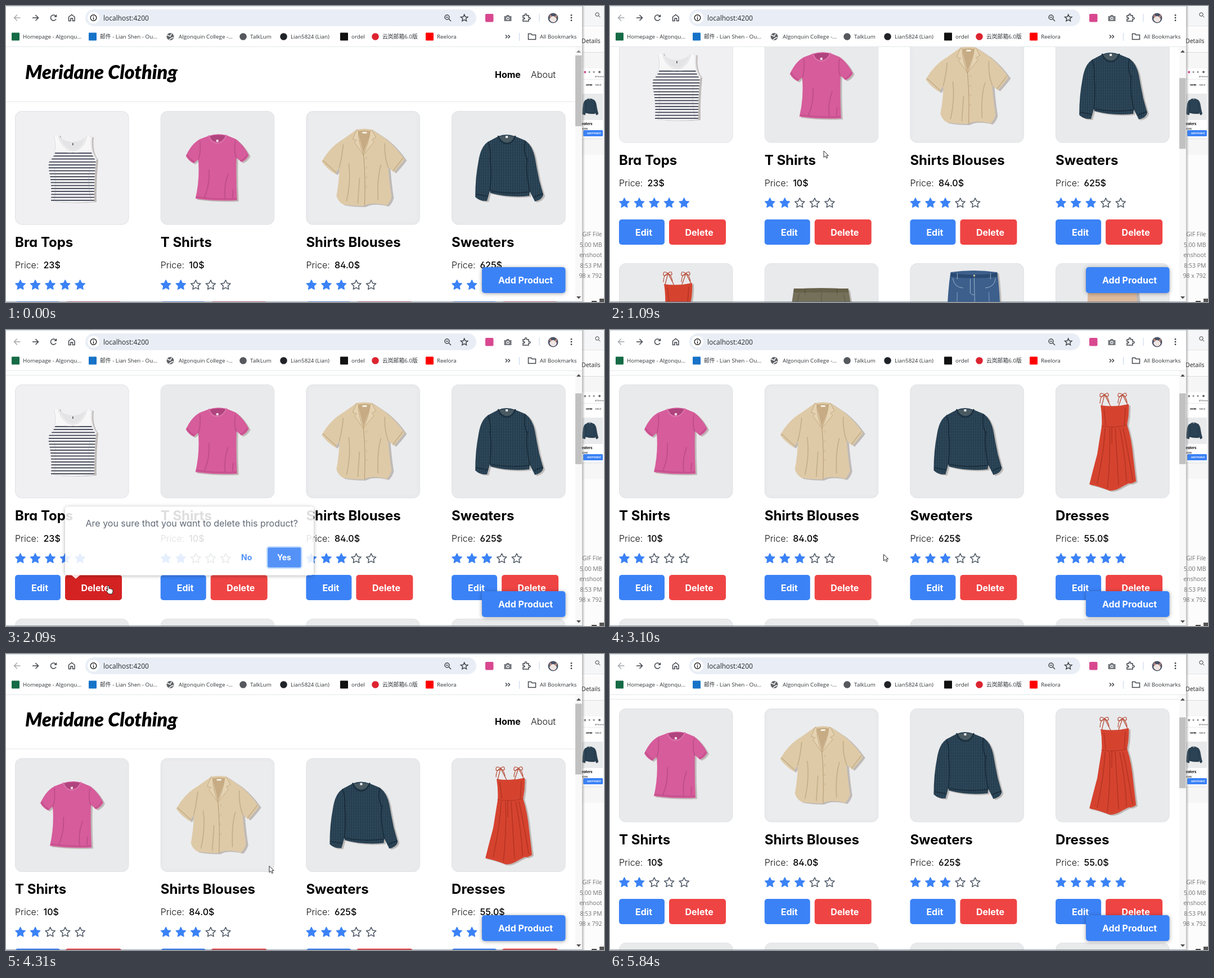
These frames come from a looping animation (1063x527 px, 5910 ms). An HTML page:

```html
<!DOCTYPE html>
<html lang="en">
<head>
<meta charset="utf-8">
<title>Clothing shop</title>
<style>
html, body { margin: 0; width: 100%; height: 100%; overflow: hidden; background: #fff; }
svg { display: block; }
text { white-space: pre; }
.ui { font-family: Inter, sans-serif; font-feature-settings: "cv02", "cv03", "cv04", "cv11"; }
.sys { font-family: "Open Sans", "Noto Sans CJK SC", "Noto Sans CJK", sans-serif; }
.ico { fill: none; stroke: #41464c; stroke-width: 1.5; }
</style>
</head>
<body>
<svg id="stage" width="1063" height="527" viewBox="0 0 1063 527">
<defs>
  <pattern id="stripe" width="200" height="5.25" y="74" patternUnits="userSpaceOnUse">
    <rect width="200" height="5.25" fill="#f4f4f6"/><rect width="200" height="1.8" fill="#3c4150"/>
  </pattern>
  <pattern id="rib" width="4" height="5" patternUnits="userSpaceOnUse">
    <rect width="4" height="5" fill="#2b4557"/><rect width="1.4" height="5" fill="#233a4b"/><rect x="2.4" y="1" width="1" height="2" fill="#345062"/>
  </pattern>
  <clipPath id="view"><rect y="73" width="1012" height="454"/></clipPath>
  <filter id="soft" x="-20%" y="-40%" width="140%" height="190%"><feDropShadow dx="0" dy="1" stdDeviation="3.6" flood-opacity=".36"/></filter>
  <linearGradient id="edge"><stop stop-color="#777" stop-opacity=".5"/><stop offset="1" stop-color="#777" stop-opacity="0"/></linearGradient>
</defs>
</svg>
<script>
const LOOP = 5910, BLUE = '#3b82f6', RED = '#ef4444';
const stage = document.getElementById('stage');

const rect = (x, y, w, h, fill, r = 0, more = '') =>
  `<rect x="${x}" y="${y}" width="${w}" height="${h}" rx="${r}" fill="${fill}" ${more}/>`;
const circle = (x, y, r, fill, more = '') => `<circle cx="${x}" cy="${y}" r="${r}" fill="${fill}" ${more}/>`;
const path = (d, fill, more = '') => `<path d="${d}" fill="${fill}" ${more}/>`;
const line = (d, color, w = 1, more = '') => path(d, 'none', `stroke="${color}" stroke-width="${w}" stroke-linecap="round" ${more}`);
const icon = d => `<path class="ico" d="${d}"/>`;
const ui = (x, y, size, weight, str, fill = '#000') =>
  `<text class="ui" x="${x}" y="${y}" font-size="${size}" font-weight="${weight}" fill="${fill}">${str}</text>`;
const sys = (x, y, size, str, fill = '#303438', more = '') =>
  `<text class="sys" x="${x}" y="${y}" font-size="${size}" fill="${fill}" ${more}>${str}</text>`;

// Outline with a cast shadow behind it
const cloth = (d, fill, dx = 3, dy = 2) =>
  path(d, '#b5aeab', `transform="translate(${dx} ${dy})" opacity=".8"`) + path(d, fill);
const folds = (d, color = '#000', o = .14) => line(d, color, 1.6, `opacity="${o}"`);

const sweater = () => {
  const d = 'M83 45Q97 39 113 45L130 52Q143 60 148 82Q151 100 156 124L163 149Q161 158 148 161L139 143L138 151Q104 155 69 146L68 142L63 160Q50 161 42 153Q42 118 48 88Q52 62 66 54Z';
  return cloth(d, 'url(#rib)') +
    path('M84 46Q98 42 112 46Q107 56 98 56Q89 55 84 46Z', '#4a5a62') + rect(96, 44, 4, 4, '#eee') +
    line('M83 45Q88 58 98 58Q108 58 113 45', '#1b3040', 2.5) +
    folds('M68 142Q72 106 68 84M139 143Q131 106 135 84M65 55Q70 70 69 86M131 53Q127 70 134 86M44 148L64 152M147 153L162 147M70 142Q104 149 138 144', '#08141e', .5);
};

const wear = {
  bra() {
    const neck = 'M77 43Q84 70 103 71Q122 70 128 43', arms = 'M69 45Q77 72 61 88M136 46Q133 72 144 86';
    const body = neck + 'L136 46Q133 72 144 86Q140 124 141 161Q101 165 64 160Q66 130 60 104Q59 96 61 88Q77 72 69 45Z';
    return cloth(body, '#f7f7f8', 4, 1) + path('M77 43Q84 54 103 55Q121 54 128 43Q122 70 103 71Q84 70 77 43Z', '#e4e4e7') +
      rect(102, 57, 1.6, 4, '#555') +
      path('M73 71Q86 75 103 74Q122 75 135 71L144 86Q140 124 141 161Q101 165 64 160Q66 130 60 104Q59 96 61 88Z', 'url(#stripe)') +
      line(neck + arms, '#f7f7f8', 3) + line(neck + arms, '#c7c8cc', .7) +
      folds('M70 100Q75 130 70 158M133 100Q128 128 135 158', '#778', .2);
  },
  tee() {
    const d = 'M86 44Q101 39 117 43L134 50Q149 62 157 79Q152 88 144 91L135 83Q134 120 136 159Q100 161 62 156Q70 122 67 86L59 93Q50 89 45 80Q55 58 70 50Z';
    return cloth(d, '#d65c9b') + path('M87 45Q101 41 116 44Q112 55 101 56Q91 55 87 45Z', '#b0447e') + rect(99, 51, 4, 4, '#f3dce8') +
      line('M86 44Q90 57 101 57Q112 56 117 43', '#dd74ab', 2) +
      folds('M67 87Q72 74 70 54M135 84Q130 74 133 54M78 154Q88 130 86 105M115 156Q112 135 120 112M128 154L129 140M47 78Q52 86 60 91M154 78Q150 86 142 89M64 153Q100 158 135 156', '#702050', .26);
  },
  blouse() {
    const d = 'M90 33Q104 30 117 33L141 49Q160 64 175 86Q168 96 156 109L146 100Q148 128 152 153Q149 163 143 168Q116 161 102 169Q78 169 65 166Q56 160 54 151Q59 124 59 101L52 112Q37 103 28 90Q42 64 66 50Z';
    return cloth(d, '#decaa7', 4, 2) + path('M92 36Q104 33 116 36L102 75Z', '#c6ab84') + rect(100, 37, 8, 3, '#f5efe2') +
      path('M90 33L83 50L90 52L86 56L102 78Q92 52 93 36ZM117 33L124 47L117 51L121 55L102 78Q112 54 114 36Z', '#e4d2b1', 'stroke="#b69a70" stroke-width=".7"') +
      line('M102 77Q106 120 104 168', '#ae936b', .9) +
      [84, 101, 118, 135].map(y => circle(107, y, 1.2, '#f0e4cc', 'stroke="#a98c62" stroke-width=".5"')).join('') +
      folds('M59 101Q64 82 66 60M146 100Q139 82 140 58M72 160Q80 125 76 94M128 158Q126 120 133 96M92 164L95 120M30 88L53 109M172 84L155 106', '#644820', .22);
  },
  sweater,
  dress() {
    const d = 'M80 37Q105 41 130 35Q131 54 127 72Q135 96 138 130L143 172Q137 177 130 176L120 181Q106 190 96 189Q76 181 60 178Q67 150 74 124Q78 98 82 74Q83 56 80 37Z';
    const bow = 'M0 0Q-8 3 -8 15M0 0Q6 3 8 14M0 0Q-9 -6 -8 3Q-5 6 0 0Q7 -6 7 2Q4 5 0 0';
    return cloth(d, '#d5432f') + line('M82 38L87 18L98 39M112 38L119 18L128 36', '#b8503c', 1.3) +
      [87, 119].map(x => line(bow, '#b8503c', 1.3, `transform="translate(${x} 18)"`)).join('') +
      line('M82 74Q105 78 127 72', '#b33321', 1.2) +
      folds('M88 78Q86 120 74 176M96 78Q98 130 92 184M106 78Q109 125 112 179M114 78Q124 125 126 174M120 78Q129 120 137 170M86 44L89 72M124 42L122 72M100 76L100 105', '#721408', .3);
  },
  shorts: () => cloth('M52 46Q101 42 149 46Q156 90 164 135L108 140L101 98L94 140L38 135Q46 90 52 46Z', '#74705a') +
    rect(52, 45, 97, 7, '#666149') + folds('M101 53L101 98M62 55L52 90M140 55L150 90M72 46V55M129 46V55'),
  jeans: () => cloth('M72 16Q112 10 155 16Q164 80 158 190L122 192L115 74L106 192L68 190Q62 80 72 16Z', '#3c5f8c') +
    path('M73 17Q112 24 155 17L155 24Q112 29 72 24Z', '#2a4a72') + circle(114, 22, 1.7, '#d9c79a') +
    line('M114 26L115 74M76 27Q78 43 94 44M152 27Q150 43 134 44M84 18V28M143 18V28M107 28V52Q109 57 114 56', '#a9bdd1', .9) +
    folds('M84 52L80 180M140 52L145 180', '#fff', .25),
  cami: () => line('M65 15Q62 30 60 45M132 15Q136 30 140 45M65 15Q79 10 84 21L72 35M132 15Q118 11 114 22L125 35', '#c49470', 1.5) +
    cloth('M58 42Q76 30 98 47Q121 31 142 43L146 80L154 170Q100 178 48 170L56 80Z', '#ddba9c', 6, 3) + folds('M57 82Q100 90 146 82M82 90L76 168M120 90L126 168'),
  vest: () => cloth('M66 46L84 43Q101 66 118 43L136 46Q134 72 148 88L145 164H57L54 88Q68 72 66 46Z', '#f6f4ef') + folds('M72 100L70 160M130 100L133 160')
};

const items = [
  ['bra', 'Bra Tops', '23$', 5], ['tee', 'T Shirts', '10$', 2], ['blouse', 'Shirts Blouses', '84.0$', 3],
  ['sweater', 'Sweaters', '625$', 3], ['dress', 'Dresses', '55.0$', 5], ['shorts', 'Shorts', '32$', 3],
  ['jeans', 'Jeans', '49$', 4], ['cami', 'Camisoles', '18$', 4], ['vest', 'Vests', '15$', 3]
];

function star(x, y, on) {
  const pts = Array.from({ length: 10 }, (_, i) => {
    const r = i % 2 ? 4.4 : 9, a = i * Math.PI / 5 - Math.PI / 2;
    return (x + r * Math.cos(a)).toFixed(1) + ',' + (y + r * Math.sin(a)).toFixed(1);
  });
  return `<polygon points="${pts.join(' ')}" fill="${on ? BLUE : 'none'}" stroke="${on ? BLUE : '#4b5563'}" stroke-width="1.5" stroke-linejoin="round"/>`;
}

// Local origin: top left of the picture box
function card([kind, name, price, rate], i) {
  let s = rect(.5, .5, 201.5, 201.5, kind === 'bra' ? '#f0f0f3' : '#e9eaec', 11.5, 'stroke="#dfe1e5"');
  if (kind === 'blouse') s += rect(5, 5, 192, 192, '#ebecee', 4);
  s += wear[kind]() + ui(0, 241.8, 24, 700, name) + ui(0, 279.6, 16, 300, 'Price:', '#111') + ui(50.5, 279.6, 16, 500, price);
  for (let k = 0; k < 5; k++) s += star(9.5 + k * 26.55, 310, k < rate);
  s += rect(0, 339, 81, 45, BLUE, 5) + rect(89, 339, 101, 45, RED, 5, i ? '' : 'id="del"') +
    ui(29, 367.5, 16, 700, 'Edit', '#fff') + ui(117.5, 367.5, 16, 700, 'Delete', '#fff');
  return `<g class="card">${s}</g>`;
}

const page = `<g clip-path="url(#view)"><g id="page">
  <text x="34" y="130" font-family="Lato, sans-serif" font-size="34" font-weight="900" font-style="italic">Meridane Clothing</text>
  ${ui(869, 127.8, 16, 700, 'Home')}${ui(933, 127.8, 16, 300, 'About', '#111')}
  ${rect(0, 170, 1012, 1, '#e5e7eb')}${items.map(card).join('')}</g></g>`;

const scrollbar = rect(1012, 73, 12, 452, '#f8f8f8') + path('M1014 83L1018 78.5L1022 83Z', '#8a8a8a', 'id="up"') +
  path('M1014 517L1018 521.5L1022 517Z', '#505050') + rect(1012, 88, 11.5, 126, '#c1c1c1', 0, 'id="thumb"');

const addButton = `<g filter="url(#soft)">${rect(846, 465, 148.5, 46, BLUE, 5)}</g>` + ui(875, 493.7, 16, 700, 'Add Product', '#fff');

const popup = `<g id="popup"><g filter="url(#soft)">${rect(105, 314.5, 442, 122, '#fff', 5)}</g>
  ${path('M116 436H132L124 443Z', '#fff')}
  ${ui(141.5, 349.8, 16, 400, 'Are you sure that you want to delete this product?', '#4b5563')}
  ${ui(418, 410, 14, 700, 'No', BLUE)}
  ${rect(464, 386, 61.5, 38, BLUE, 4, 'id="yes" stroke="#bfdbfe" stroke-width="2.4"')}${ui(482, 410, 14, 700, 'Yes', '#fff')}</g>`;

const bookmarks = [
  [30, 'Homepage - Algonqu...', '#146b45', 0], [167, '邮件 - Lian Shen - Ou...', '#1673c8', 0], [307, 'Algonquin College -...'],
  [434, 'TalkLum', '#55585c', 1], [506, 'Lian5824 (Lian)', '#1f2328', 1], [614, 'ordel', '#111', 0],
  [669, '云岚邮箱6.0版', '#dc2430', 1], [766, 'Reelora', '#f00', 0]
].map(([x, name, color, round]) => sys(x, 58.4, 9.8, name) + (!color
  ? circle(x - 15, 54.5, 6.5, '#5f6368') + line(`M${x - 20} 52L${x - 15} 54L${x - 13} 50M${x - 17} 60L${x - 13} 57L${x - 10} 56`, '#fff', 1.5)
  : round ? circle(x - 12.5, 54.5, 6.3, color) : rect(x - 20, 47.5, 14, 14, color, 1))).join('');

const chrome = rect(0, 0, 1024, 73, '#fff') + rect(0, 0, 1024, 1, '#ccd6e4') + rect(0, 72, 1024, 1, '#e3e5e8') +
  rect(141, 6, 695, 30, '#e9eef6', 15) + circle(155.5, 21, 10.5, '#fff') +
  line('M25 21H15M19.5 16L14.5 21L19.5 26', '#a4a7ab', 1.4) +
  icon('M47 21H57M52.5 16L57.5 21L52.5 26M88.5 18A5 5 0 1 0 89 23M89.5 15.5V19H86M111.5 19.5V26.5H115V22H118.5V26.5H122V19.5L116.8 15.5Z') +
  circle(155.5, 21, 5.3, 'none', 'stroke="#222" stroke-width="1.4"') + line('M155.5 20.8V23.8M155.5 18.4V18.5', '#222', 1.4) +
  sys(173, 25.6, 12, 'localhost:4200', '#24282d') +
  icon('M788 20A4 4 0 1 1 780 20A4 4 0 1 1 788 20M787 23L791 27M782 20H786') +
  icon('M814.7 15.2L816.5 19.2L820.9 19.6L817.6 22.5L818.5 26.8L814.7 24.6L810.9 26.8L811.8 22.5L808.5 19.6L812.9 19.2Z') +
  rect(852, 14, 14.5, 14.5, '#d9488f', 2) +
  path('M885.5 18H889L890 16H894L895 18H898.5V27H885.5Z', '#75797e') + circle(892, 22.3, 2.7, '#fff') + circle(892, 22.3, 1.5, '#75797e') +
  icon('M919 17H922.5Q922 14 924 14Q926 14 925.5 17H929V20.5Q932 20 932 22Q932 24 929 23.5V27H919V23.5Q922 23.5 922 22Q922 20.5 919 20.5Z') +
  rect(947.5, 14, 1, 14, '#c6d4ec') + circle(972.5, 21.5, 9, '#4a5266') +
  path('M966 23Q972 13 979 23Q978 29 972 29Q967 28 966 23Z', '#efe6e2') + path('M966 20L967 15L971 19M975 19L979 15V21Z', '#c98a78') +
  [16.3, 21, 25.7].map(y => circle(1005, y, 1.4, '#41464c')).join('') +
  bookmarks + icon('M888 51.5L891 54.5L888 57.5M892.5 51.5L895.5 54.5L892.5 57.5') + rect(912, 48, 1, 14, '#c6d4ec') +
  icon('M928.5 50V59.5H941.5V51.5H935L933.5 49.5H928.5Z') + sys(949, 58.4, 9.8, 'All Bookmarks');

const facts = [[410, 'GIF File'], [429, '5.00 MB'], [447, 'enshoot'], [466, '8:53 PM'], [484, '98 x 792']]
  .map(([y, s]) => sys(1059.5, y, 10.5, s, '#747474', 'text-anchor="end"')).join('');
const behind = rect(1024, 0, 39, 527, '#fcfcfc') + rect(1024, 0, 39, 35, '#f5f6f8') + rect(1024, 35, 39, 1, '#e4e4e4') +
  circle(1051, 15, 3.2, 'none', 'stroke="#444"') + line('M1053.5 17.5L1056 20', '#444') +
  sys(1023, 65.5, 10.5, 'Details', '#222') + rect(1024, 82, 39, 1, '#ddd') + rect(1024, 83, 39, 182, '#f6f6f6') + rect(1024, 111, 37, 125, '#fff') +
  rect(1027.5, 116, 3.5, 3.5, '#d9488f', 0, 'id="dot"') + circle(1037, 117.5, 1.5, '#888') + circle(1045, 117.5, 1.6, '#888') + circle(1055, 117.5, 2, '#666') +
  sys(1047, 126.5, 3.2, 'All Bookmarks') + rect(1024, 130, 37, .6, '#ddd') + ui(1031, 142.4, 4, 700, 'Home') + ui(1047, 142.4, 4, 300, 'About') +
  rect(1024, 156, 37, 47, '#e9eaec', 2) + `<g transform="translate(1014.5 154) scale(.235 .25)">${sweater()}</g>` +
  ui(1023.5, 212.4, 6, 700, 'eaters') + ui(1024, 220, 4, 500, '625$') + rect(1026, 221, 35, 11, BLUE, 1.5) + ui(1033, 228, 4, 700, 'Add Product', '#fff') +
  rect(1024, 236, 37, 1, '#ddd') + facts + rect(1041, 525, 9, 2, '#444') + rect(1055, 521, 8, 6, '#555') + rect(1024, 0, 5, 527, 'url(#edge)');

const cursor = `<g id="cursor"><path id="arrow" d="M0 0V11.5L2.8 9L4.7 13L6.6 12.2L4.8 8.2H8.2Z" fill="#fff" stroke="#111" stroke-width=".9"/>
  <path id="hand" d="M-1.2 1Q0 -1 1.2 1V5.5Q2.5 4.5 3.5 6Q5 5 5.8 6.6Q8 6 8 8V11Q7.5 13 6.5 15H.5Q-2 12 -3.6 9.5Q-3.5 7.6 -1.2 9Z" fill="#fff" stroke="#111" stroke-width=".9"/></g>`;

stage.innerHTML += rect(0, 0, 1024, 527, '#fff') + page + chrome + scrollbar + addButton + popup +
  rect(0, 526, 1024, 1, '#536a86', 0, 'opacity=".6"') + behind + cursor;

// Bursts of redraws: start, end, count
const bursts = [[200, 420, 4], [680, 950, 5], [1090, 1620, 8], [1690, 2230, 9], [2290, 2840, 9],
  [2910, 3100, 4], [3440, 3850, 6], [4110, 4520, 6], [4710, 4850, 3], [5840, 5840, 1]];
const scrollKeys = [[612, 0], [680, 18], [748, 75], [815, 130.5], [883, 170], [950, 181], [1014, 181], [1090, 146],
  [1166, 104], [1241, 90.5], [1620, 90.5], [1690, 90], [3358, 90], [3440, 106], [3522, 150], [3604, 176], [3686, 181],
  [4028, 181], [4110, 120], [4192, 35], [4274, 1.5], [4356, .5], [4438, 0], [5839, 0], [5840, 90]];
const cursorKeys = [[200, 942, 486], [273, 700, 400], [347, 450, 290], [420, 380, 258], [1241, 380, 258], [1393, 330, 330],
  [1544, 215, 430], [1690, 182, 455], [2222, 182, 455], [2290, 215, 445], [2428, 360, 410], [2565, 520, 380], [2634, 564, 374],
  [2772, 505, 394], [2840, 486.5, 399.5], [3604, 486.5, 399.5], [3768, 468, 377.5], [4640, 468, 377.5], [4710, 520, 405], [4780, 620, 450], [4850, 658, 467]];
const popupKeys = [[1960, 0], [2027, .4], [2095, .87], [2162, 1], [2846, 1], [2910, .8], [2973, .4], [3037, 0]];

function snap(t) {
  const b = bursts.filter(b => b[0] <= t).pop();
  if (!b) return 0;
  const [from, to, n] = b, gap = (to - from) / (n - 1) || 1;
  return from + gap * Math.min(n - 1, Math.floor((t - from) / gap + .3));
}

function sample(keys, t) {
  const i = keys.findIndex(k => k[0] > t);
  if (i < 0) return keys[keys.length - 1].slice(1);
  if (!i) return keys[0].slice(1);
  const a = keys[i - 1], b = keys[i], p = (t - a[0]) / (b[0] - a[0]);
  return a.slice(1).map((v, k) => v + (b[k + 1] - v) * p);
}

const $ = id => document.getElementById(id);
const cards = [...document.querySelectorAll('.card')];
const inside = (x, y, l, t, r, b) => x >= l && x <= r && y >= t && y <= b;
const show = (el, on) => el.setAttribute('visibility', on ? 'visible' : 'hidden');

function draw(time) {
  const t = snap(time), [scroll] = sample(scrollKeys, t), [x, y] = sample(cursorKeys, t), [fade] = sample(popupKeys, t);
  const gone = t >= 2973 ? 1 : 0, shown = t >= 200 && t < 5840;
  $('page').setAttribute('transform', `translate(0 ${-scroll})`);
  $('thumb').setAttribute('y', 88 + scroll * .276);
  $('up').setAttribute('fill', scroll > 1 ? '#505050' : '#8a8a8a');
  cards.forEach((c, i) => {
    const k = i - gone;
    show(c, k >= 0);
    c.setAttribute('transform', `translate(${16 + (k & 3) * 258.7} ${187 + (k >> 2) * 417})`);
  });
  const onYes = fade > .5 && inside(x, y, 464, 386, 526, 424);
  const onDel = !gone && shown && inside(x, y, 105, 436, 206, 481);
  $('popup').setAttribute('opacity', fade);
  $('yes').setAttribute('fill', onYes ? '#2563eb' : BLUE);
  $('del').setAttribute('fill', onDel ? '#d42222' : RED);
  $('dot').setAttribute('fill', t < 1690 ? '#d9488f' : '#8a8a8a');
  $('cursor').setAttribute('transform', `translate(${x} ${y})`);
  show($('arrow'), shown && !onYes && !onDel);
  show($('hand'), shown && (onYes || onDel));
}

const start = performance.now();
function tick(now) {
  draw(Math.max(0, now - start) % LOOP);
  requestAnimationFrame(tick);
}
draw(0);
requestAnimationFrame(tick);
</script>
</body>
</html>
```
